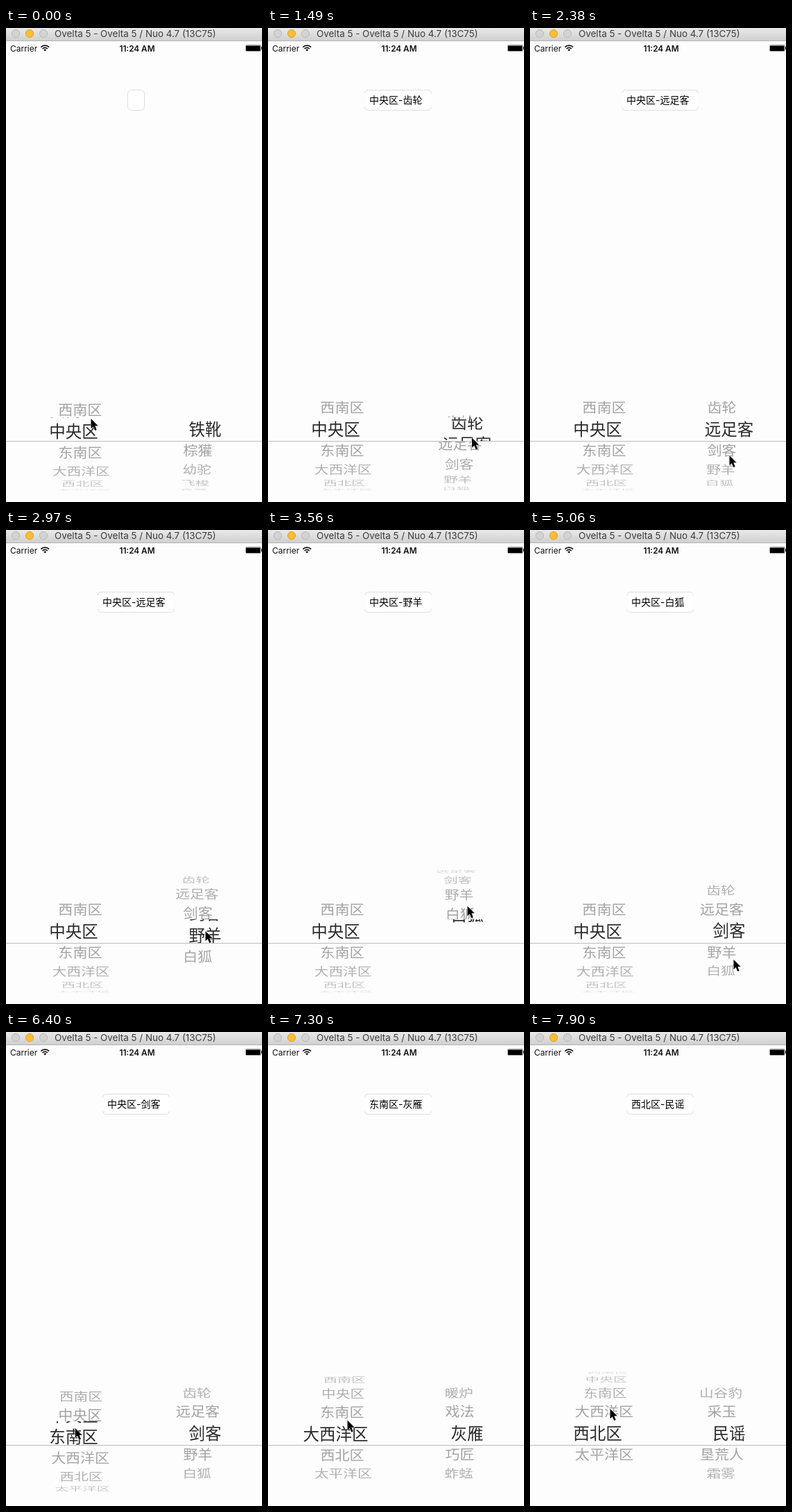
An HTML page for the animation above (8 s loop, 369 by 683 pixels).

```html
<!DOCTYPE html>
<html lang="zh">
<head>
<meta charset="utf-8">
<title>Picker</title>
<style>
  html, body { margin: 0; width: 100%; height: 100%; overflow: hidden; background: #fdfdfd; }
  svg { display: block; }
  text { font-family: "Noto Sans CJK SC", "Noto Sans CJK", sans-serif; white-space: pre; }
  .ui { font-family: Inter, "Noto Sans CJK SC", sans-serif; }
  .wheel text { font-size: 23.5px; text-anchor: middle; }
  .drum { fill: #9f9f9f; }
  .band { fill: #2a2a2a; }
</style>
</head>
<body>
<svg width="369" height="683" viewBox="0 0 369 683">
  <defs>
    <linearGradient id="bar" x2="0" y2="1">
      <stop offset="0" stop-color="#e9e9e9"/>
      <stop offset="1" stop-color="#d0d0d0"/>
    </linearGradient>
    <clipPath id="inside"><rect y="561" width="369" height="34"/></clipPath>
    <clipPath id="outside">
      <rect y="470" width="369" height="91"/>
      <rect y="596" width="369" height="87"/>
    </clipPath>
  </defs>
  <rect width="369" height="683" fill="#fdfdfd"/>

  <rect width="369" height="18" fill="url(#bar)"/>
  <rect y="18" width="369" height="1" fill="#b4b4b4"/>
  <circle cx="14" cy="8" r="5.6" fill="#d3d3d3" stroke="#b9b9b9"/>
  <circle cx="34" cy="8" r="5.6" fill="#fdbe2f" stroke="#dfa02a"/>
  <circle cx="54" cy="8" r="5.6" fill="#d3d3d3" stroke="#b9b9b9"/>
  <text class="ui" x="70" y="13" font-size="13.4" fill="#3c3c3c">Ovelta 5 - Ovelta 5 / Nuo 4.7 (13C75)</text>

  <text class="ui" x="6" y="33.5" font-size="12" fill="#111">Carrier</text>
  <g fill="none" stroke="#111" stroke-width="1.7">
    <path d="M50.3 27.6a8.4 8.4 0 0 1 11.8 0M52.6 30a5 5 0 0 1 7.2 0"/>
    <path d="M56.2 33.6l-2-2.2a3 3 0 0 1 4 0z" fill="#111" stroke="none"/>
  </g>
  <text class="ui" x="189" y="33.5" font-size="11.8" font-weight="600" text-anchor="middle" fill="#111">11:24 AM</text>
  <rect x="345.5" y="24.5" width="22" height="9" rx="1.5" fill="none" stroke="#a0a0a0"/>
  <rect x="346" y="25.5" width="20.5" height="7.5" rx=".5"/>
  <rect x="368" y="27" width="1" height="4" fill="#333"/>

  <rect id="box" y="89.5" height="29" rx="5" fill="#fff" stroke="#dedede"/>
  <g id="gaps" fill="#fdfdfd">
    <rect y="94" width="3" height="20"/>
    <rect y="94" width="3" height="20"/>
  </g>
  <text id="field" class="ui" y="108.6" font-size="14"></text>

  <g id="drum" class="wheel drum" clip-path="url(#outside)"></g>
  <g id="band" class="wheel band" clip-path="url(#inside)"></g>
  <rect y="595" width="369" height="1" fill="#bcbcbc"/>
  <path id="cursor" d="M0 0V14.2L3.2 11.2L5.7 17L8.2 15.9L5.8 10.3H10.2Z" stroke="#fff" paint-order="stroke"/>
</svg>
<script>
const $ = id => document.getElementById(id);
const LOOP = 8000, TICK = 148.8, COMMIT_DELAY = 100;
const RADIUS = 87.6, ROW = 20.7 * Math.PI / 180, MID = 578, AXIS = 187, DEPTH = 1000;

const areas = ['西南区', '中央区', '东南区', '大西洋区', '西北区', '太平洋区'];
const teams = {
  西南区: ['铁靴', '棕獾', '幼驼', '飞梭', '青鹭'],
  中央区: ['齿轮', '远足客', '剑客', '野羊', '白狐'],
  东南区: ['暖炉', '戏法', '灰雁', '巧匠', '蚱蜢'],
  西北区: ['山谷豹', '采玉', '民谣', '垦荒人', '霜雾']
};

// A move eases from the previous place to a new one.
const move = (start, end, ...to) => ({ start, end, to });
const leftMoves = [move(0, 40, 1), move(5980, 6556, 2), move(7000, 7600, 4)];
const rightMoves = [
  move(1230, 1940, 1), move(2380, 3120, 3),
  move(3270, 3560, 4.76), move(3560, 4010, 4), // pull past the end, spring back
  move(4410, 5110, 2)
];
const pointerMoves = [
  move(300, 1190, 295, 601), move(1190, 1790, 293, 580), move(1790, 2300, 287.5, 616),
  move(2400, 2820, 287.5, 567), move(2820, 3270, 287.5, 606), move(3270, 3560, 287.5, 542),
  move(3860, 4350, 290, 560), move(4350, 4910, 293.5, 619), move(5060, 5800, 101, 596),
  move(5950, 6550, 99.5, 566), move(6550, 6950, 112, 602), move(7000, 7450, 115.5, 543)
];

function place(from, moves, t) {
  let at = from;
  for (const { start, end, to } of moves) {
    const u = Math.min(1, Math.max(0, (t - start) / (end - start)));
    const s = u * u * (3 - 2 * u);
    at = at.map((v, i) => v + (to[i] - v) * s);
  }
  return at;
}

// The last row on which a wheel has come to rest.
function settled(moves, t) {
  const done = moves.filter(m => Number.isInteger(m.to[0]) && t >= m.end + COMMIT_DELAY);
  return done.length ? done[done.length - 1].to[0] : 0;
}

function addText(parent) {
  const el = document.createElementNS('http://www.w3.org/2000/svg', 'text');
  el.setAttribute('y', 8.8);
  return parent.appendChild(el);
}

// Rows lie on a drum; the band shows an enlarged copy of the same rows.
function makeWheel(shift) {
  const rows = areas.map(() => [addText($('drum')), addText($('band'))]);
  return (labels, pos) => rows.forEach(([dim, big], i) => {
    const angle = (i - pos) * ROW, c = Math.cos(angle);
    const y = MID + RADIUS * Math.sin(angle);
    const seen = i < labels.length && Math.abs(angle) < 1.53;
    const p = .9 * DEPTH / (DEPTH + RADIUS * (1 - c));
    for (const el of [dim, big]) {
      el.style.display = seen ? '' : 'none';
      el.textContent = labels[i] || '';
    }
    dim.setAttribute('transform', `translate(${AXIS + shift * p} ${y}) scale(${p} ${p * c})`);
    dim.setAttribute('opacity', .3 + .7 * c);
    big.setAttribute('transform', `translate(${AXIS + shift} ${y}) scale(1 ${c})`);
  });
}

function drawField(label) {
  const half = label ? 48 + (label.length - 6) * 7 : 12;
  const left = 187.5 - half;
  $('box').setAttribute('x', left);
  $('box').setAttribute('width', half * 2);
  $('gaps').style.display = label ? '' : 'none';
  [...$('gaps').children].forEach((gap, i) => gap.setAttribute('x', left + i * half * 2 - 1.5));
  $('field').setAttribute('x', left + 6.5);
  $('field').textContent = label;
}

const drawLeft = makeWheel(-89.5), drawRight = makeWheel(100);

function draw(t) {
  const pick = settled(leftMoves, t);
  const area = areas[pick], list = teams[area];
  drawLeft(areas, place([.89], leftMoves, t)[0]);
  drawRight(list, place([0], rightMoves, t)[0]);
  drawField(pick ? area + '-' + list[settled(rightMoves, t)] : '');
  $('cursor').setAttribute('transform', `translate(${place([122.5, 563], pointerMoves, t).join(' ')})`);
}

const start = performance.now();
let last = -1;
function frame() {
  const t = (performance.now() - start) % LOOP;
  const step = Math.floor((t + 12) / TICK);
  if (step !== last) draw((last = step) * TICK + 2);
  requestAnimationFrame(frame);
}
frame();
</script>
</body>
</html>
```
